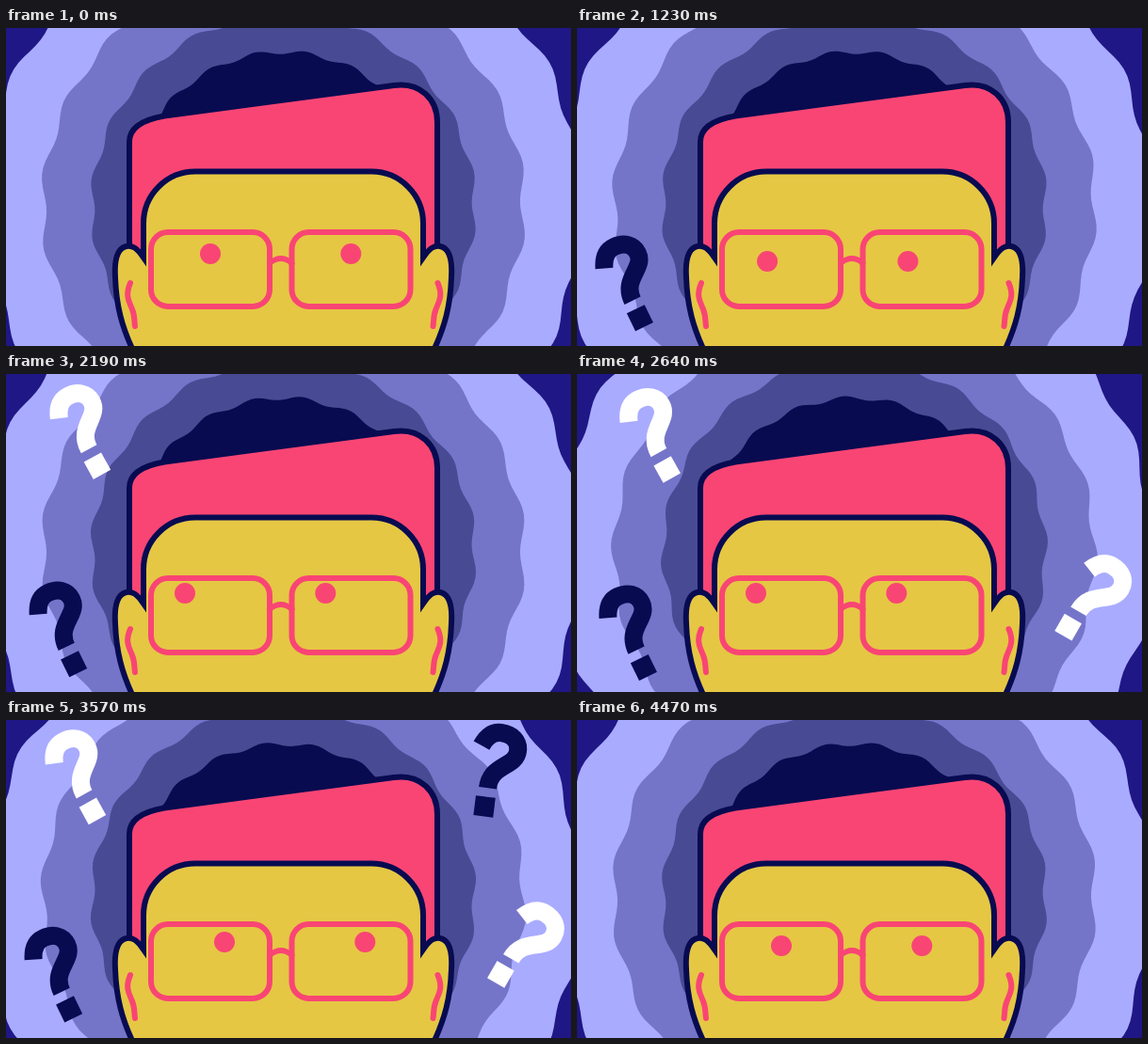
Animation of 600x338 px, one loop 4.5 s. Source, as an HTML page:

```html
<!DOCTYPE html>
<html lang="en">
<head>
<meta charset="utf-8">
<title>Wondering</title>
<style>
html, body { margin: 0; width: 100%; height: 100%; overflow: hidden; background: #1e1785; }
svg { display: block; width: 100vw; height: 100vh; }
</style>
</head>
<body>
<svg viewBox="0 0 600 338" preserveAspectRatio="xMidYMid slice">
  <defs>
    <g id="mark">
      <path d="M-11-64C-7-74-1-80 8-80C20-80 28-73 28-63C28-45 1-46 1-20" fill="none" stroke="currentColor" stroke-width="19"/>
      <rect x="-10.5" y="-10.5" width="21" height="21" fill="currentColor"/>
    </g>
    <path id="fold" d="M132 271C126 285 131 291 134 299C137 306 136 311 137 317"/>
    <rect id="lens" y="217" width="126" height="79" rx="18"/>
  </defs>
  <rect width="600" height="338" fill="#1e1785"/>
  <g id="rings"></g>
  <g stroke="#080b50" stroke-width="6">
    <path fill="#f94574" d="M131 245V121Q131 100 168 93.5L412 61C440 57 458 76 458 100V245Z"/>
    <path fill="#e5c744" stroke-miterlimit="8" d="M136 345C123 318 117 295 116 265C115 248 118 234 128 232C135 231 139 234 146 244V208A55 55 0 0 1 201 152.5H388A55 55 0 0 1 443 208V244C450 234 454 231 461 232C471 234 474 248 473 265C472 295 466 318 453 345Z"/>
  </g>
  <g id="eyes" fill="#f94574">
    <circle r="11"/>
    <circle cx="149.3" r="11"/>
  </g>
  <g fill="none" stroke="#f94574" stroke-width="6" stroke-linecap="round">
    <use href="#lens" x="154"/>
    <use href="#lens" x="303.5"/>
    <path d="M280 250Q292 240 303.5 250"/>
    <use href="#fold"/>
    <use href="#fold" transform="translate(590.5 0) scale(-1 1)"/>
  </g>
  <g id="marks"></g>
</svg>
<script>
const LOOP = 4500, WAVES = 20, STEP = 1125, TAU = 2 * Math.PI;
const CX = 294.5, CY = 189.5;
const NAVY = '#080b50', WHITE = '#fff';

const add = (parent, tag, attrs) => {
  const el = document.createElementNS('http://www.w3.org/2000/svg', tag);
  for (const k in attrs) el.setAttribute(k, attrs[k]);
  return document.getElementById(parent).appendChild(el);
};
const clamp = v => Math.max(0, Math.min(1, v));
const ease = p => (1 - Math.cos(Math.PI * clamp(p))) / 2;

const rings = [
  { r: 317, dir: 1, fill: '#a9abff' },
  { r: 255, dir: -1, fill: '#7475c9' },
  { r: 203, dir: 1, fill: '#484b93' },
  { r: 164, dir: 1, fill: NAVY }
];
rings.forEach(ring => ring.el = add('rings', 'path', { fill: ring.fill }));

// A wavy circle that turns by one wave per STEP
function ringPath({ r, dir }, t) {
  const peak = TAU * (8 / 360 + dir * t / STEP / WAVES);
  const points = Array.from({ length: 240 }, (_, i) => {
    const a = TAU * i / 240;
    const rad = r * (1 + 0.014 * Math.cos(WAVES * (a - peak)));
    return (CX + rad * Math.sin(a)).toFixed(2) + ' ' + (CY - rad * Math.cos(a)).toFixed(2);
  });
  return 'M' + points.join('L') + 'Z';
}

// In order of appearance
const marks = [
  { x: 69.5, y: 309, rot: -26, color: NAVY },
  { x: 94.3, y: 98.5, rot: -29, color: WHITE },
  { x: 523, y: 270, rot: 30, color: WHITE },
  { x: 505.7, y: 91.5, rot: 7, color: NAVY }
];
marks.forEach(m => m.el = add('marks', 'use', { href: '#mark', color: m.color }));

function drawMark(m, i, t) {
  const fadeIn = clamp((t - 800 - 710 * i) / 290);
  const fadeOut = clamp((t - 3860 - 25 * i) / 360);
  const left = m.x < CX;
  const turn = TAU * (t - 1710) / (LOOP / 2);
  const x = m.x + (left ? 2.7 : -2.7) * Math.sin(turn);
  const y = m.y + (left ? -3.5 : 1) * Math.cos(turn);
  m.el.setAttribute('opacity', fadeIn * (1 - fadeOut));
  m.el.setAttribute('transform', `translate(${x} ${y}) rotate(${m.rot})`);
}

// Where the eyes turn, relative to rest
const looks = [
  { at: 1000, x: -24, y: 13 },
  { at: 1720, x: -27, y: -7 },
  { at: 2650, x: 15, y: -4 },
  { at: 3830, x: 0, y: 0 }
];
const eyes = document.getElementById('eyes');

function drawEyes(t) {
  let x = 0, y = 0;
  for (const look of looks) {
    const p = ease((t - look.at) / 400);
    x += (look.x - x) * p;
    y += (look.y - y) * p;
  }
  eyes.setAttribute('transform', `translate(${217 + x} ${240 + y})`);
}

function draw(t) {
  rings.forEach(ring => ring.el.setAttribute('d', ringPath(ring, t)));
  marks.forEach((m, i) => drawMark(m, i, t));
  drawEyes(t);
}

const begin = performance.now();
function tick() {
  draw((performance.now() - begin) % LOOP);
  requestAnimationFrame(tick);
}
tick();
</script>
</body>
</html>
```
